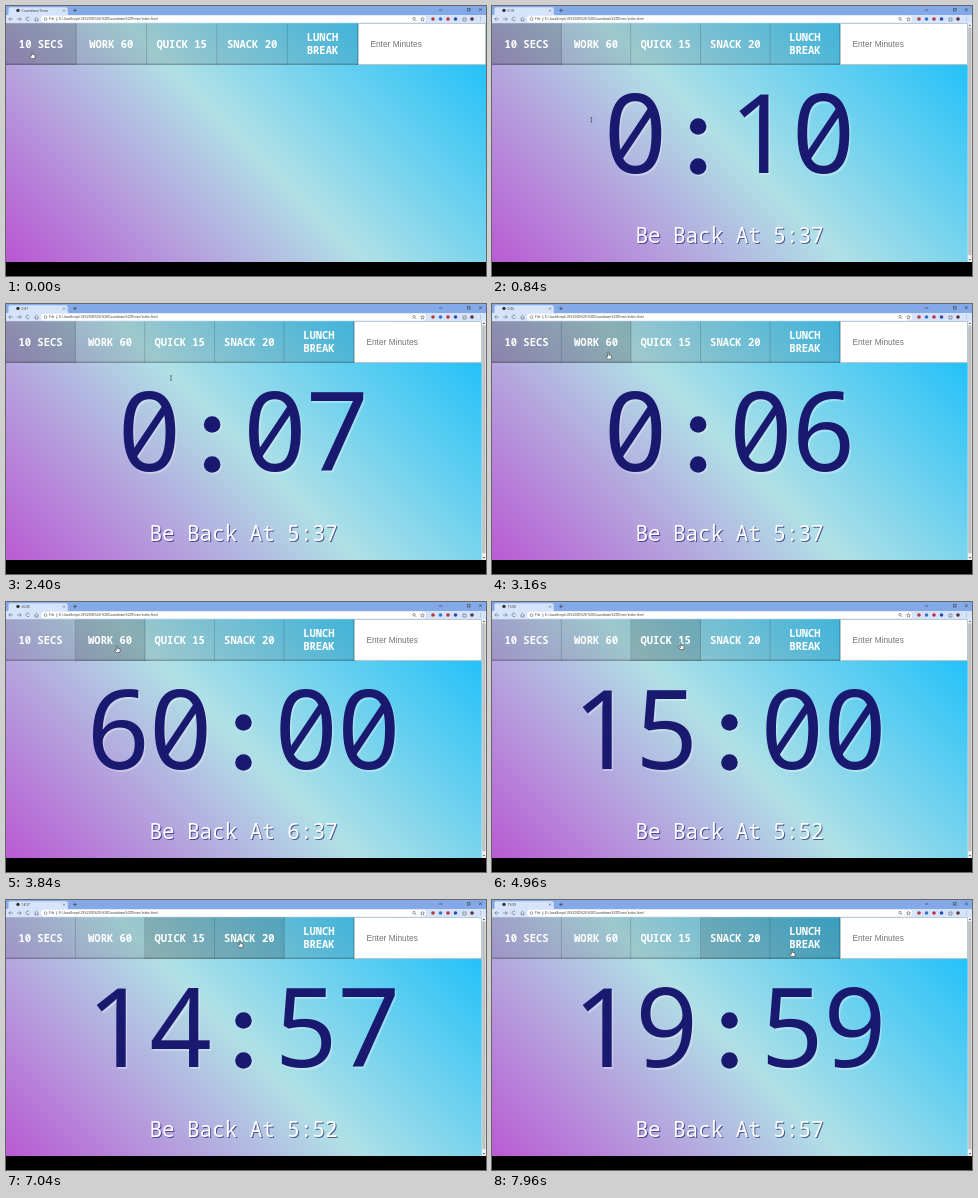
An HTML page for the animation above (8000 ms loop, 480 by 270 pixels).

```html
<!DOCTYPE html>
<html lang="en">
<head>
<meta charset="utf-8">
<title>Countdown Timer</title>
<style>
  html, body { margin: 0; width: 100%; height: 100%; overflow: hidden; background: #000; }
  svg { display: block; width: 100vw; height: 100vh; }
  text { font-family: "Noto Sans Mono", "DejaVu Sans Mono", monospace; white-space: pre; }
  .ui { font-family: Roboto, "Open Sans", sans-serif; font-size: 3.4px; fill: #3c4043; }
  .label { font-size: 10.5px; font-weight: 600; fill: #fff; text-anchor: middle; }
  .hint { font-family: "Liberation Sans", Arial, sans-serif; font-size: 8.35px; fill: #757575; }
  .digit { font-family: "Noto Sans", "Open Sans", sans-serif; font-size: 109px; font-weight: 300; text-anchor: middle; }
  #back { font-size: 20.9px; font-weight: 500; text-anchor: middle; }
  .line { fill: none; stroke: #5f6368; stroke-width: .6; }
</style>
</head>
<body>
<svg viewBox="0 0 480 270" preserveAspectRatio="none">
  <defs>
    <linearGradient id="sky" gradientUnits="userSpaceOnUse">
      <stop offset="0" stop-color="#ba55d3"/>
      <stop offset=".5" stop-color="#b0e0e6"/>
      <stop offset="1" stop-color="#12bdfb"/>
    </linearGradient>
    <g id="time"></g>
    <text id="back" x="237.5" y="237"></text>
  </defs>

  <rect id="page" y="17" width="480" height="240" fill="url(#sky)"/>
  <g id="buttons"></g>
  <rect id="field" y="17.3" height="41.4" fill="#fff" stroke="#aaa" stroke-width=".6"/>
  <text id="hint" class="hint" y="41">Enter Minutes</text>
  <use href="#time" x="1.5" y="1.5" fill="#fff" stroke="#fff" opacity=".3"/>
  <use href="#time" fill="#191970" stroke="#191970"/>
  <use href="#back" x="1" y="1" fill="#191970" opacity=".65"/>
  <use href="#back" fill="#fff"/>
  <g id="scroll">
    <rect x="475.7" y="17" width="4.3" height="240" fill="#f1f1f1"/>
    <rect x="476.2" y="21.3" width="3.3" height="228" fill="#c1c1c1"/>
    <path d="M476.7 20l1.2-1.4 1.2 1.4zM476.7 253l1.2 1.4 1.2-1.4z" fill="#505050"/>
  </g>

  <rect width="480" height="9.5" fill="#84a9e8"/>
  <path d="M1 9.5q1.5 0 1.5-2V3q0-1.7 1.7-1.7H60q1.7 0 1.7 1.7v4.5q0 2 1.5 2z" fill="#d6e4fb"/>
  <circle cx="12" cy="4.4" r="1.7" fill="#333"/>
  <text id="tab" class="ui" x="15.5" y="5.6"></text>
  <path class="line" d="M57 3.6l2 2m0-2l-2 2"/>
  <path d="M69 2.6v3.6m-1.8-1.8h3.6M433 4h3.4M461.5 2.5h2.6v2.6h-2.6zM473 2.3l2.8 2.8m0-2.8l-2.8 2.8" fill="none" stroke="#333" stroke-width=".6"/>

  <rect y="9" width="480" height="8.2" fill="#d6e4fb"/>
  <rect x="35" y="9.8" width="385" height="6.6" rx="3.3" fill="#fff"/>
  <path class="line" d="M7 13H2.8l1.7-1.7M2.8 13l1.7 1.7M11 13h4.2l-1.7-1.7m1.7 1.7l-1.7 1.7M23.3 11.8a1.8 1.8 0 1 0 .2 1.8M28.5 13.2l2-1.8 2 1.8M29.2 13v2h2.6v-2"/>
  <circle class="line" cx="39.5" cy="13.1" r="1.4"/>
  <text class="ui" x="43" y="14.4">File</text>
  <path class="line" d="M50.8 11.4v3.6"/>
  <text class="ui" x="53" y="14.4">E:/JavaScript/JS%2030%20-%20Countdown%20Timer/index.html</text>
  <circle class="line" cx="408" cy="12.7" r="1.3"/>
  <path class="line" d="M409 13.7l1.3 1.3M416.5 11.2l.6 1.3 1.4.2-1 1 .2 1.4-1.2-.7-1.2.7.2-1.4-1-1 1.4-.2zM457 12h3v3h-3zM474.5 11v.6m0 1.2v.6m0 1.2v.6"/>
  <g id="marks"></g>

  <g id="cursor">
    <path id="hand" d="M-.6-2.6q0-.7.6-.7t.6.7v2.1l1.9.4q.9.2.7 1.1l-.6 2.6H-.7L-2.2 1.5q-.4-.7.2-.9.5-.1 1.4.8z" fill="#fff" stroke="#222" stroke-width=".5"/>
    <path id="beam" d="M-.9-2.2H.9M0-2.2v4.4M-.9 2.2H.9" fill="none" stroke="#333" stroke-width=".55"/>
  </g>
  <rect y="256" width="480" height="14" fill="#000"/>
</svg>

<script>
const LOOP = 8000;
const NS = "http://www.w3.org/2000/svg";
const PITCH = 62.7;
const $ = id => document.getElementById(id);

// start, clock, return time, focused button
const states = [
  [0, "", "", -1],
  [160, "0:10", "5:37", 0], [860, "0:09", "5:37", 0], [1560, "0:08", "5:37", 0],
  [2260, "0:07", "5:37", 0], [2960, "0:06", "5:37", 0],
  [3720, "60:00", "6:37", 1], [4420, "59:59", "6:37", 1],
  [4880, "15:00", "5:52", 2], [5580, "14:59", "5:52", 2],
  [6280, "14:58", "5:52", 2], [6980, "14:57", "5:52", 2],
  [7160, "20:00", "5:57", 3], [7860, "19:59", "5:57", 3]
];

// time, x, y of the pointer
const path = [
  [0, 26, 49], [480, 26, 49], [1200, 172, 178], [1640, 180, 186], [1840, 180, 186],
  [2400, 165, 74], [3300, 113, 50], [3600, 111, 47], [4000, 111, 47], [4520, 189, 44],
  [5360, 189, 44], [5880, 234, 44], [7660, 234, 44], [7940, 300, 53]
];

function add(parent, tag, attrs, text) {
  const el = document.createElementNS(NS, tag);
  set(el, attrs);
  if (text) el.textContent = text;
  parent.append(el);
  return el;
}

function set(el, attrs) {
  for (const k in attrs) el.setAttribute(k, attrs[k]);
}

[["#b33a3a", 427], ["#3d6fc4", 434.5], ["#c22f3a", 442], ["#2f49b5", 449.5], ["#5c2f3a", 466]]
  .forEach(([fill, cx]) => add($("marks"), "circle", { cx, cy: 13, r: 1.8, fill }));

const buttons = ["10 SECS", "WORK 60", "QUICK 15", "SNACK 20", "LUNCH BREAK"].map((name, i) => {
  const g = add($("buttons"), "g", {});
  const face = add(g, "rect", { y: 17, height: 42 });
  const base = add(g, "rect", { y: 57.5, height: 1.5, "fill-opacity": .22 });
  const side = add(g, "rect", { y: 17, width: .7, height: 42, "fill-opacity": .22 });
  const lines = i < 4 ? [[name, 41.6]] : name.split(" ").map((w, n) => [w, 35 + 13 * n]);
  const labels = lines.map(([s, y]) => add(g, "text", { class: "label", y }, s));
  return { face, base, side, labels };
});

function layout(running) {
  const w = running ? 475.7 : 480;
  const h = running ? 252 : 240;
  const bw = running ? 69.6 : 70.4;
  const cx = w / 2, cy = 17 + h / 2, d = (w + h) / 4;
  set($("sky"), { x1: cx - d, y1: cy + d, x2: cx + d, y2: cy - d });
  buttons.forEach((b, i) => {
    const x = i * bw;
    set(b.face, { x, width: bw });
    set(b.base, { x, width: bw });
    set(b.side, { x: x + bw - .7 });
    b.labels.forEach(l => set(l, { x: x + bw / 2 - .3 }));
  });
  set($("field"), { x: 5 * bw + .3, width: w - 5 * bw - .6 });
  set($("hint"), { x: 5 * bw + 12.4 });
  $("scroll").style.display = running ? "" : "none";
  return bw;
}

// Large digits, with a slash through each zero and round colon dots
function setClock(clock) {
  const g = $("time");
  if (g.dataset.clock === clock) return;
  g.dataset.clock = clock;
  g.replaceChildren();
  [...clock].forEach((c, i) => {
    const x = 237.5 + (i - (clock.length - 1) / 2) * PITCH;
    if (c === ":") {
      [120.5, 160.5].forEach(cy => add(g, "circle", { cx: x, cy, r: 8.3, "stroke-width": 0 }));
      return;
    }
    add(g, "text", { class: "digit", x, y: 167, "stroke-width": 0 }, c);
    if (c === "0") add(g, "path", { d: `M${x - 17} 153L${x + 17} 102`, "stroke-width": 7 });
  });
}

function pointer(t) {
  const i = path.findIndex(p => p[0] > t);
  if (i < 0) return path[path.length - 1].slice(1);
  const [a, b] = [path[i - 1], path[i]];
  const u = (t - a[0]) / (b[0] - a[0]);
  const e = u * u * (3 - 2 * u);
  return [a[1] + (b[1] - a[1]) * e, a[2] + (b[2] - a[2]) * e];
}

function draw(t) {
  const [, clock, back, focus] = states.filter(s => s[0] <= t).pop();
  const bw = layout(clock !== "");
  const [x, y] = pointer(t);
  const hover = y < 59 ? Math.floor(x / bw) : -1;
  buttons.forEach((b, i) =>
    set(b.face, { "fill-opacity": i === hover || i === focus ? .22 : .11 }));
  setClock(clock);
  $("back").textContent = back && "Be Back At " + back;
  $("tab").textContent = clock || "Countdown Timer";
  set($("cursor"), { transform: `translate(${x} ${y})` });
  $("hand").style.display = y < 59 ? "" : "none";
  $("beam").style.display = y < 59 ? "none" : "";
}

const start = performance.now();
function frame() {
  draw((performance.now() - start) % LOOP);
  requestAnimationFrame(frame);
}
frame();
</script>
</body>
</html>
```
